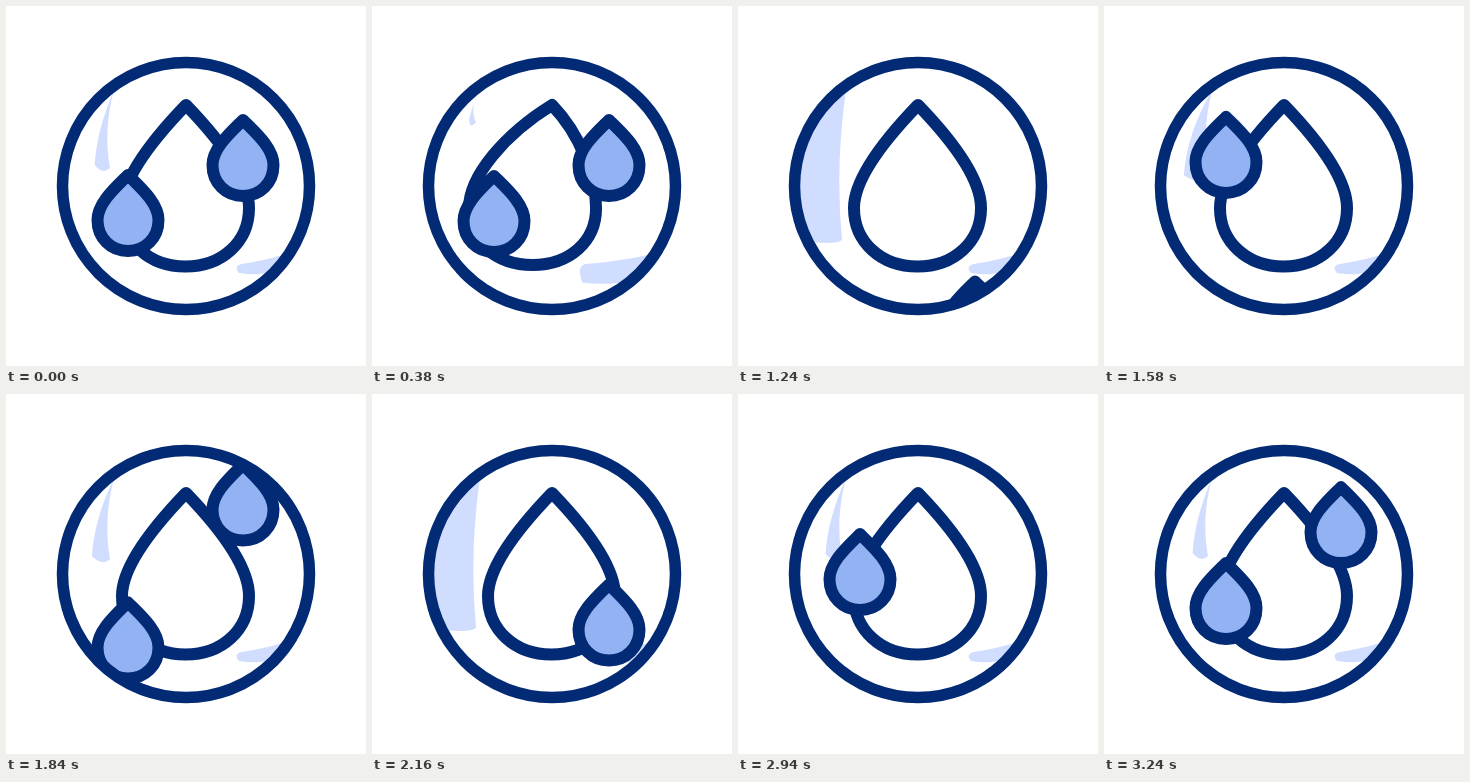
An HTML page for the animation above (3260 ms loop, 360 by 360 pixels).

```html
<!DOCTYPE html>
<html lang="en">
<head>
<meta charset="utf-8">
<title>Water drops</title>
<style>
  html, body { margin: 0; width: 100%; height: 100%; overflow: hidden; background: #fff; }
  svg { display: block; width: 100vw; height: 100vh; }
  .line { stroke: #022a75; stroke-width: 12; stroke-linejoin: round; fill: none; }
  .ring { stroke-width: 11.5; }
  .small { fill: #93b2f3; }
  .shade { fill: #d1ddff; }
</style>
</head>
<body>
<svg viewBox="0 0 360 360">
  <defs>
    <clipPath id="inside"><circle cx="180" cy="180" r="122"/></clipPath>
    <path id="drop" d="M0 0C-12 12-30.5 28-30.5 45C-30.5 63-17 76 0 76S30.5 63 30.5 45C30.5 28 12 12 0 0Z"/>
  </defs>
  <g clip-path="url(#inside)">
    <path id="shadeLeft" class="shade"/>
    <path id="shadeRight" class="shade"/>
    <path id="body" class="line"/>
    <use id="dropLeft" href="#drop" class="line small"/>
    <use id="dropRight" href="#drop" class="line small"/>
  </g>
  <circle class="line ring" cx="180" cy="180" r="123.5"/>
</svg>
<script>
const LOOP = 3260, HOLD = 280, SWAY = 700;
const el = id => document.getElementById(id);
const setPath = (id, d) => el(id).setAttribute("d", d);

// One damped swing of the large drop, first to the left.
function swing(t) {
  const k = (t - HOLD) / SWAY;
  if (k <= 0 || k >= 1) return 0;
  return -26 * Math.sin(2 * Math.PI * k) * Math.sqrt(1 - k);
}

// Vertical offset of a small drop: it speeds up, passes once, then settles.
function fall(t, start, middle, end) {
  if (t < start) return 0;
  const first = 3.93e-4 * (t - start) ** 2;
  if (first < 200) return first;
  const pass = 0.375 * (t - middle);
  if (pass < 200) return pass;
  return -4.78e-4 * Math.max(end - t, 0) ** 2;
}

// The tip stays fixed while the round part moves sideways and lifts a little.
function bodyPath(s) {
  const left = 116 + s, right = 243 + s, mid = 179.5 + s;
  const bottom = 260.5 - Math.abs(s) * 0.08;
  return `M180 99C${152 + Math.min(s, 0)} 128 ${left} 170 ${left} 202` +
    `C${left} 236 ${mid - 36.5} ${bottom} ${mid} ${bottom}` +
    `S${right} 236 ${right} 202C${right} 170 ${208 + Math.max(s, 0)} 128 180 99Z`;
}

// The left shade grows as its drop moves away and shrinks with the swing.
function shadeLeftPath(offset, s) {
  const away = Math.min(Math.abs(offset) / 110, 1) ** 3;
  const bottom = 165 + 72 * away + 2.4 * Math.min(s, 0);
  const mid = (84 + bottom) / 2;
  const edge = 104 - 0.19 * (bottom - 84) - 45 * away;
  return `M108 84Q97 ${mid} 104 ${bottom - 3}` +
    `Q97 ${bottom + 4} ${edge} ${bottom - 6}Q${edge + 2} ${mid} 108 84Z`;
}

function shadeRightPath(s) {
  const x = 230 + 1.2 * s, low = 267 - 0.5 * s;
  return `M290 245Q262 254 ${x + 6} 258Q${x - 3} 260 ${x + 3} ${low}` +
    `Q${x + 22} ${low + 3} 262 ${low - 1}L290 262Z`;
}

function draw(t) {
  const s = swing(t);
  const left = fall(t, 332, 1736, 3187);
  const right = fall(t, 600, 1957, 3450);
  setPath("body", bodyPath(s));
  setPath("shadeLeft", shadeLeftPath(left, s));
  setPath("shadeRight", shadeRightPath(s));
  el("dropLeft").setAttribute("transform", `translate(122 ${169 + left})`);
  el("dropRight").setAttribute("transform", `translate(237 ${114 + right})`);
}

const begin = performance.now();
function tick() {
  draw((performance.now() - begin) % LOOP);
  requestAnimationFrame(tick);
}
tick();
</script>
</body>
</html>
```
